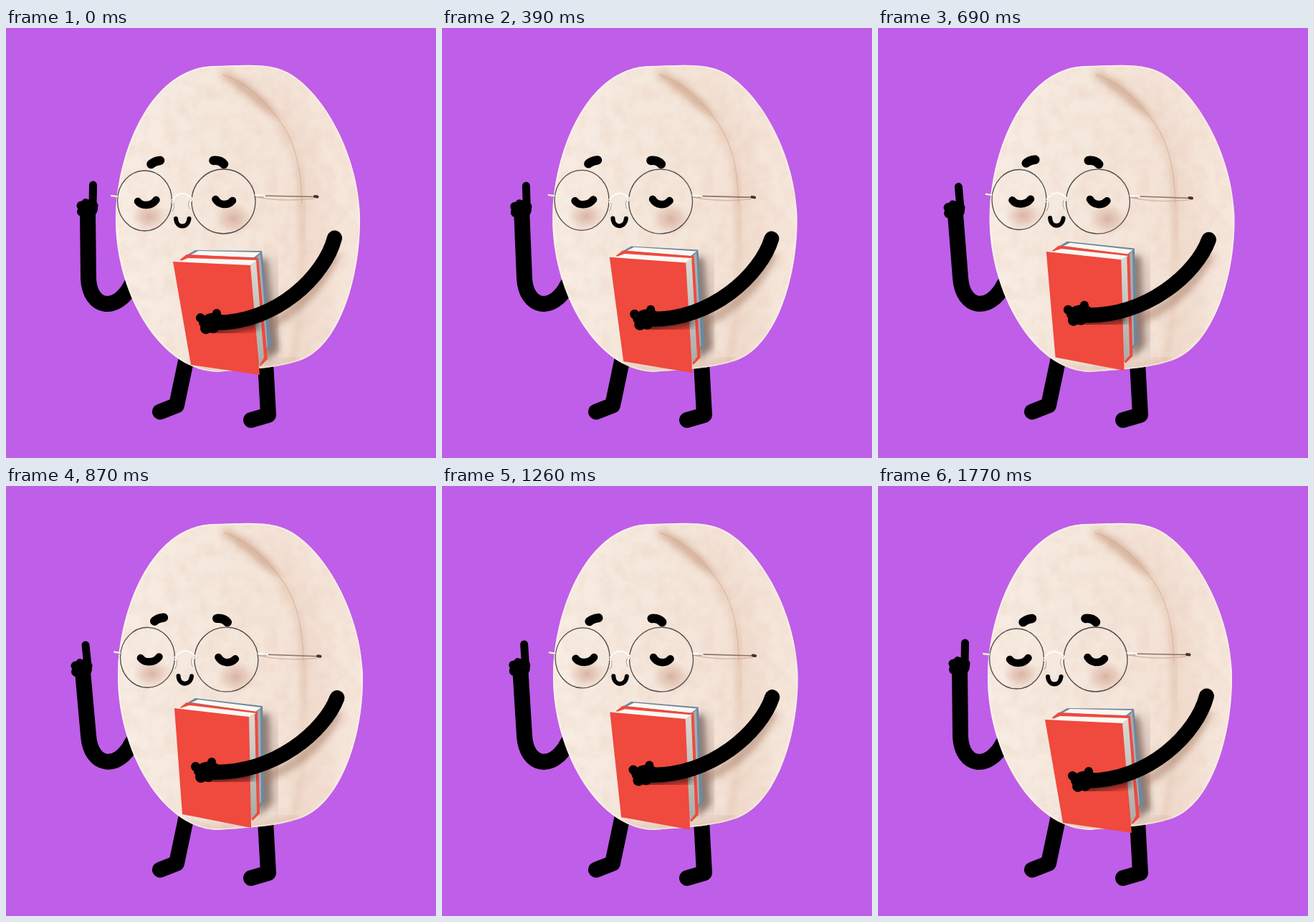
An HTML page that plays this animation: 600x600 px, repeating every 1.8 s.

```html
<!DOCTYPE html>
<html lang="en">
<head>
<meta charset="utf-8">
<title>Reader</title>
<style>
  html, body { margin: 0; width: 100%; height: 100%; overflow: hidden; background: #bf5ee9; }
  svg { display: block; width: 100%; height: 100%; }
  .ink { fill: none; stroke: #000; stroke-linecap: round; stroke-linejoin: round; }
  .limb { stroke-width: 22; }
  .red { fill: #f0493e; }
  .paper { fill: #fbf8f3; }
  .wire { fill: none; stroke: #514a4a; stroke-width: 1.3; }
  .glint { fill: none; stroke: #fffdf8; stroke-width: 2; stroke-linecap: round; }
</style>
</head>
<body>
<svg viewBox="0 0 600 600">
  <defs>
    <path id="shape"
      d="M290 53C320 53 350 49 378 56C432 70 494 170 494 268C494 350 465 445 410 464C375 476 335 476 295 480C215 478 153 370 153 268C153 176 201 55 290 53Z"
      data-to="M290 53C320 53 350 49 379 56C435 70 498 172 498 270C498 352 466 445 410 464C375 476 335 477 295 480C217 478 156 368 156 266C156 176 201 55 290 53Z"/>
    <clipPath id="inside"><use href="#shape"/></clipPath>
    <linearGradient id="skin">
      <stop offset="0" stop-color="#f8ede4"/>
      <stop offset=".35" stop-color="#f5e8dd"/>
      <stop offset=".7" stop-color="#f4e4d8"/>
      <stop offset="1" stop-color="#f6e7dc"/>
    </linearGradient>
    <radialGradient id="blush">
      <stop offset="0" stop-color="#d0a292" stop-opacity=".75"/>
      <stop offset=".5" stop-color="#dab4a3" stop-opacity=".5"/>
      <stop offset="1" stop-color="#e5c8b8" stop-opacity="0"/>
    </radialGradient>
    <linearGradient id="edge" x1="0" y1="0" x2="0" y2="1">
      <stop offset="0" stop-color="#dcdad3"/>
      <stop offset="1" stop-color="#a9aaa6"/>
    </linearGradient>
    <filter id="soft" x="-50%" y="-50%" width="200%" height="200%"><feGaussianBlur stdDeviation="5"/></filter>
    <filter id="hazy" x="-50%" y="-50%" width="200%" height="200%"><feGaussianBlur stdDeviation="12"/></filter>
    <filter id="mottle" x="0" y="0" width="1" height="1" color-interpolation-filters="sRGB">
      <feTurbulence type="fractalNoise" baseFrequency=".05" numOctaves="4" seed="4"/>
      <feColorMatrix values="0 0 0 0 .88  0 0 0 0 .74  0 0 0 0 .65  .45 0 0 0 -.16"/>
    </filter>
  </defs>

  <rect width="600" height="600" fill="#bf5ee9"/>

  <!-- legs and raised arm -->
  <path class="ink limb" d="M252 460L238 526.500L215 535.500"/>
  <path class="ink limb" d="M362 466L366 540L342 547"/>
  <path class="ink limb" d="M114 256L115 350C117 392 155 398 175 358" data-to="M107 259L115 348C118 392 156 398 176 358"/>
  <path class="ink" stroke-width="11" d="M121.500 219L121 248" data-to="M111 222L114 251"/>
  <g transform="translate(0 0)" data-to="translate(-8 3)">
    <ellipse cx="114" cy="252" rx="14" ry="13"/>
    <circle cx="105" cy="248" r="6.500"/><circle cx="111" cy="243" r="5"/>
    <circle cx="106" cy="256" r="7"/><circle cx="122" cy="248" r="6.500"/>
  </g>

  <!-- body -->
  <use href="#shape" fill="url(#skin)"/>
  <g clip-path="url(#inside)">
    <rect x="150" y="48" width="350" height="436" filter="url(#mottle)"/>
    <g transform="translate(0 0)" data-to="translate(2 0)">
      <path d="M300 58C375 85 417 165 416 250C414 340 420 400 385 480L430 470C450 380 450 180 405 125C380 95 340 65 300 58Z" fill="#e3bfa9" opacity=".25" filter="url(#hazy)"/>
      <path d="M297 64C350 78 410 140 412 235C414 320 414 390 400 465" fill="none" stroke="#d7ab90" stroke-width="5" opacity=".4" filter="url(#soft)"/>
      <path d="M302 64C328 72 354 92 378 124Q347 102 302 64Z" fill="#c89b80" stroke="#c89b80" stroke-width="4" opacity=".65" filter="url(#soft)"/>
      <path d="M302 65C330 74 352 92 376 122C403 153 412 195 413 245" fill="none" stroke="#d2a68d" stroke-width="1.500" opacity=".5"/>
      <path d="M408 195Q415 220 414 300" fill="none" stroke="#d2a68d" stroke-width="5" opacity=".35" filter="url(#soft)"/>
    </g>
    <path d="M250 472Q300 484 410 465" fill="none" stroke="#cda088" stroke-width="14" opacity=".35" filter="url(#soft)"/>
    <use href="#shape" fill="none" stroke="#fffaf5" stroke-width="4" opacity=".4"/>
    <path d="M345 320L364 322L381 450L362 466Z" data-to="M345 316L367 318L371 442L352 462Z" fill="#4e3a34" opacity=".6" filter="url(#soft)"/>
    <path d="M366 320Q380 380 372 455" fill="none" stroke="#8f6c5d" stroke-width="16" opacity=".35" filter="url(#hazy)"/>
    <path d="M460 314C438 364 400 400 360 418" data-to="M463 316C440 362 398 396 356 408" fill="none" stroke="#a0745d" stroke-width="14" opacity=".5" filter="url(#soft)"/>
  </g>

  <!-- face -->
  <g transform="rotate(0 300 480)" data-to="rotate(0.95 300 480)">
    <ellipse cx="200" cy="263" rx="27" ry="22" fill="url(#blush)"/>
    <ellipse cx="317" cy="266" rx="28" ry="24" fill="url(#blush)"/>

    <path d="M350 236Q385 243 430 238" fill="none" stroke="#cda68f" stroke-width="1.500" opacity=".7"/>
    <ellipse class="wire" cx="193.500" cy="241" rx="38" ry="42"/>
    <ellipse class="wire" cx="303.500" cy="242" rx="44.500" ry="45"/>
    <path d="M355 234L434 235.500" fill="none" stroke="#8a7468" stroke-width="1.600"/>
    <path d="M431 235L434.500 235.500" stroke="#4a3029" stroke-width="4" stroke-linecap="round"/>
    <path class="glint" d="M232 240Q244 223 260 238M348 233L361 234M147 234L155 235M232 243Q236 248 232 253M259 240Q254 245 257 252"/>
    <path d="M147 236L156 237M348 236L360 236M234 244Q236 249 232 256M256 241Q253 247 257 253" fill="none" stroke="#a89a90" stroke-width="1"/>

    <path class="ink" stroke-width="12.500" d="M202.500 190Q207 186 215 185M289.500 185Q299 184 304 190"/>
    <path class="ink" stroke-width="10.500" d="M184 242C189 249 203 249 209.500 240M292.500 239C297 247 309 249 316 241"/>
    <path class="ink" stroke-width="6" d="M237 266C238 280 254 280 255.500 266"/>
  </g>

  <!-- books -->
  <path fill="#70879b" d="M250 318L264 310L357 311L371 443L362 452Z" data-to="M254 302L264 296L358 307L361 438L353 450Z"/>
  <path class="paper" d="M257 317L268 311L355 313L346 320Z" data-to="M259 302L268 298L356 309L348 315Z"/>
  <path fill="#a3adb3" d="M349 321L355 315L365 444L361 452Z" data-to="M349 316L355 311L356 440L351 450Z"/>
  <path class="red" d="M243 323L252 316L352 321L365 462L355 472Z" data-to="M243 309L252 302L351 315L354 457L344 467Z"/>
  <path class="paper" d="M239 327L254 321L350 324L341 332Z" data-to="M240 311L256 306L349 317L339 323Z"/>
  <path fill="url(#edge)" d="M340 331L349 324L360 460L353 472Z" data-to="M338 322L347 317L350 456L341 466Z"/>
  <path class="red" d="M233 326L341 331L354 484L258 470Z" data-to="M235 310L339 322L342 477L246 458Z"/>

  <!-- holding arm -->
  <path d="M352 409L288 420" data-to="M346 400L281 408" fill="none" stroke="#2b0a08" stroke-width="19" opacity=".7" filter="url(#soft)"/>
  <path class="ink" stroke-width="21" d="M458.500 293C445 345 378 412 292 411" data-to="M462 295.500C445 341 375 403 285 399"/>
  <g transform="translate(0 0)" data-to="translate(-7 -13)">
    <ellipse cx="290" cy="410" rx="18" ry="12.500"/>
    <circle cx="271.500" cy="404.500" r="6.500"/><circle cx="276" cy="411" r="7"/>
    <circle cx="279" cy="419" r="8"/><circle cx="289" cy="418" r="8"/>
    <circle cx="294" cy="398" r="6"/>
  </g>
</svg>
<script>
  const LOOP = 1800, STEP = 30, NUMBER = /-?\d+(?:\.\d+)?/g;

  const movers = [...document.querySelectorAll('[data-to]')].map(el => {
    const key = el.hasAttribute('d') ? 'd' : 'transform';
    return { el, key, from: el.getAttribute(key), to: el.dataset.to.match(NUMBER).map(Number) };
  });

  function draw(now) {
    const t = Math.floor(now % LOOP / STEP) * STEP;
    const sway = (1 - Math.cos(2 * Math.PI * t / LOOP)) / 2;
    for (const { el, key, from, to } of movers) {
      let i = 0;
      el.setAttribute(key, from.replace(NUMBER, n => (+n + (to[i++] - n) * sway).toFixed(3)));
    }
  }

  const start = performance.now();
  function tick() {
    draw(performance.now() - start);
    requestAnimationFrame(tick);
  }
  tick();
</script>
</body>
</html>
```
